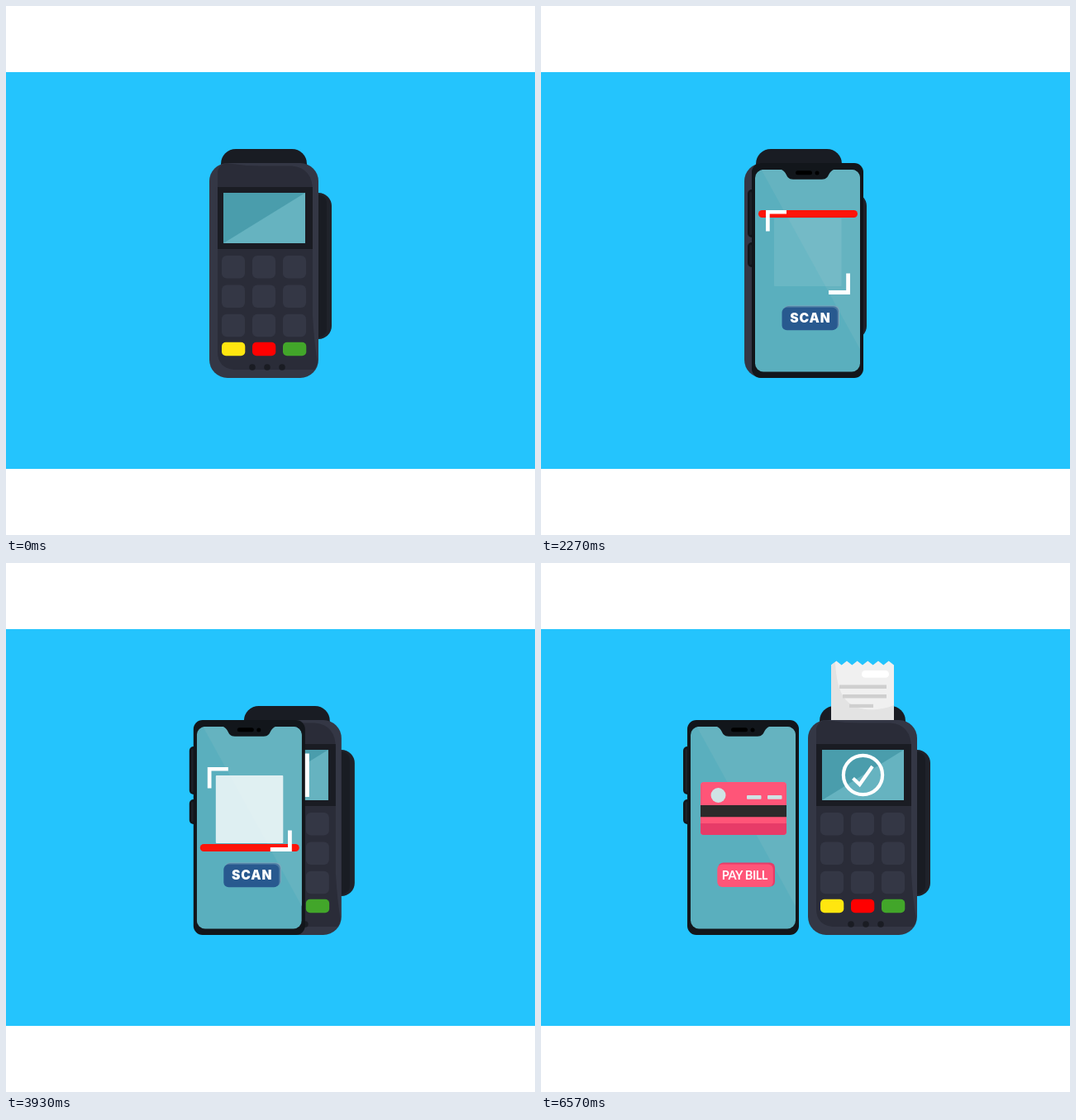
Write an HTML page with a canvas that moves like this. It is 640 px wide and 640 px high and loops after 8 s.

```html
<!DOCTYPE html>
<html lang="en">
<head>
<meta charset="utf-8">
<title>Scan and pay</title>
<style>
html, body { margin: 0; width: 100%; height: 100%; overflow: hidden; background: #fff; }
canvas { display: block; width: 640px; height: 640px; }
</style>
</head>
<body>
<canvas id="stage" width="640" height="640"></canvas>
<script>
const LOOP = 8000;
const stage = document.getElementById('stage').getContext('2d');
const scratch = document.createElement('canvas');
scratch.width = scratch.height = 640;
const layer = scratch.getContext('2d');
let c = stage;

const clamp = v => Math.max(0, Math.min(1, v));
const ramp = (t, start, len) => clamp((t - start) / len);
const inOut = p => p < 0.5 ? 4 * p ** 3 : 1 - 4 * (1 - p) ** 3;
const ease = (t, start, len) => inOut(ramp(t, start, len));
const press = (t, start) => 1 - 0.15 * (ease(t, start, 200) - ease(t, start + 200, 200));

function box(x, y, w, h, r, color) {
  c.fillStyle = color;
  c.beginPath();
  c.roundRect(x, y, w, h, r);
  c.fill();
}

function disc(x, y, r, color) {
  c.fillStyle = color;
  c.beginPath();
  c.arc(x, y, r, 0, Math.PI * 2);
  c.fill();
}

function poly(points, color) {
  c.fillStyle = color;
  c.beginPath();
  points.forEach(([x, y]) => c.lineTo(x, y));
  c.closePath();
  c.fill();
}

function shape(d, color) {
  c.fillStyle = color;
  c.fill(new Path2D(d));
}

function moved(x, y, draw) {
  c.save();
  c.translate(x, y);
  draw();
  c.restore();
}

function scaled(x, y, s, draw) {
  if (s <= 0) return;
  c.save();
  c.translate(x, y);
  c.scale(s, s);
  c.translate(-x, -y);
  draw();
  c.restore();
}

function faded(alpha, draw) {
  if (alpha <= 0) return;
  c.save();
  c.globalAlpha *= alpha;
  draw();
  c.restore();
}

// Fades everything inside as one flat picture.
function grouped(alpha, draw) {
  if (alpha <= 0) return;
  if (alpha >= 1) return draw();
  layer.clearRect(0, 0, 640, 640);
  c = layer;
  draw();
  c = stage;
  faded(alpha, () => c.drawImage(scratch, 0, 0));
}

function label(text, x, y, font, spacing) {
  c.font = font;
  c.letterSpacing = spacing + 'px';
  c.textAlign = 'center';
  c.textBaseline = 'alphabetic';
  c.fillStyle = '#fff';
  c.fillText(text, x + spacing / 2, y);
}

function receipt() {
  const edge = [[274, 200]];
  for (let i = 0; i <= 12; i++) edge.push([274 + i * 76 / 12, i % 2 ? 118.5 : 123.5]);
  edge.push([350, 200]);
  poly(edge, '#f0f0f0');
  shape('M274 123.5L279 120C280 140 283 152 289 162C299 178 326 182 350 172V200H274Z', '#e3e3e3');
  box(284, 147.5, 57, 4.5, 0, '#cfcfcf');
  box(288, 159, 53, 4.5, 0, '#cfcfcf');
  box(296, 170.8, 29, 4.2, 0, '#cfcfcf');
  box(311, 130, 33, 8.7, 4.3, '#fff');
}

function approval(t) {
  const ring = ease(t, 5240, 800);
  const tick = ease(t, 5700, 800);
  c.strokeStyle = '#fff';
  c.lineWidth = 4.2;
  if (ring > 0) {
    c.beginPath();
    c.arc(312.5, 256.5, 23.6, 0, Math.PI * 2 * ring);
    c.stroke();
  }
  if (tick > 0) {
    const first = clamp(tick / 0.3), second = clamp((tick - 0.3) / 0.7);
    c.beginPath();
    c.moveTo(300.5, 260.5);
    c.lineTo(300.5 + 8 * first, 260.5 + 7.5 * first);
    if (second > 0) c.lineTo(308.5 + 15.5 * second, 268 - 22 * second);
    c.stroke();
  }
}

function terminal(t) {
  box(260, 173, 104, 50, 18, '#191c23');
  box(350, 226, 44, 177, 16, '#1f222a');
  box(350, 228, 38, 173, [0, 10, 10, 0], '#191c23');
  const out = ease(t, 5770, 800);
  if (out > 0) moved(0, 76 * (1 - out), receipt);

  box(246, 190, 132, 260, 22, '#343745');
  shape('M256 200Q258 192 266 190Q288 193.5 310 193.5H346Q371 196 371 224V375Q373 410 377 431Q376 437 373 440H276Q256 438 256 418Z', '#2a2c38');
  box(256, 219, 115, 75, 0, '#1a1c23');
  box(263, 226, 99, 61, 0, '#4a9dac');
  poly([[362, 226], [362, 287], [263, 287]], '#66b3c0');

  for (let col = 0; col < 3; col++) {
    const x = 261 + col * 37;
    for (let row = 0; row < 3; row++) box(x, 302 + row * 35.4, 28, 27.5, 6, '#343745');
    box(x, 406.7, 28.3, 16.6, 5, ['#ffe60f', '#ff0000', '#42a62a'][col]);
    disc(298 + col * 18, 437, 3.8, '#1a1c23');
  }

  const plate = ease(t, 0, 400) - ease(t, 5190, 400);
  scaled(313, 256.7, plate, () => box(287, 230.5, 52, 52.5, 0, '#fff'));
  approval(t);
}

function scanView(t) {
  const code = 0.8 * ramp(t, 2130, 1200);
  faded(code, () => box(204, 257, 81.5, 82, 1, '#fff'));

  const grow = ease(t, 1870, 400);
  if (grow > 0) {
    const y = 247 + 93 * ease(t, 2270, 830);
    box(185, y, 120 * grow, 9, 4.5, '#ff1409');
  }

  shape('M194 247H219V251.6H198.7V272.5H194Z', '#fff');
  shape('M296 349H270V344H291.2V323.5H296Z', '#fff');

  scaled(248, 378, press(t, 1470), () => {
    box(215.5, 362.5, 67.5, 28, 6, '#7fa6bb');
    box(215, 363.3, 67, 28, 6, '#4a7ba3');
    box(213.5, 364.8, 67, 27.5, 6, '#28598f');
    label('SCAN', 247.5, 383.2, '900 15.6px Inter, sans-serif', 0.9);
  });
}

function payView(t) {
  box(193, 265, 104, 64, 4, '#ff5578');
  box(193, 315, 104, 14, [0, 0, 4, 4], '#e73b68');
  box(193, 293, 104, 14.3, 0, '#2a2a2a');
  disc(214.5, 281, 9, '#cfe3e5');
  box(249, 281, 17.5, 4.8, 1, '#cfe3e5');
  box(274, 281, 17.5, 4.8, 1, '#cfe3e5');

  scaled(248, 378, press(t, 4830), () => {
    box(214.5, 362.5, 68.5, 29, 6, '#e73b68');
    box(213.3, 364.5, 67.5, 27.5, 6, '#ff5578');
    label('PAY BILL', 246.5, 382.7, '700 14.5px Lato, sans-serif', -0.5);
  });
}

function phone(t) {
  box(172, 222, 14, 58, 5, '#12161b');
  box(172, 286, 14, 30, 5, '#12161b');
  box(174.5, 225, 2.5, 52, 1, '#1d2128');
  box(174.5, 289, 2.5, 24, 1, '#1d2128');
  box(177, 190, 135, 260, 11, '#12161b');
  c.save();
  c.beginPath();
  c.roundRect(181, 198, 127, 244.5, 10);
  c.clip();
  box(181, 198, 127, 245, 0, '#5aafbe');
  poly([[188, 197], [309, 197], [309, 417]], '#65b3c0');
  c.restore();
  shape('M208 197C222 198 216 209.7 227 209.7H262C273 209.7 267 198 281 197Z', '#12161b');
  box(230, 199.3, 20, 5, 2.5, '#000');
  disc(256, 202, 2.5, '#000');

  faded(1 - ramp(t, 4200, 300), () => scanView(t));
  faded(ramp(t, 4420, 360), () => payView(t));
}

function draw(t) {
  c = stage;
  box(0, 0, 640, 640, 0, '#fff');
  box(0, 80, 640, 480, 0, '#24c4fd');
  const apart = ease(t, 3572, 800);
  moved(77 * apart, 0, () => terminal(t));
  const arrive = ease(t, 600, 800);
  const x = 78 * (1 - apart) + 155 * (1 - arrive);
  grouped(ramp(t, 600, 400), () => moved(x, 0, () => phone(t)));
}

const begin = performance.now();
function tick(now) {
  draw(Math.max(0, now - begin) % LOOP);
  requestAnimationFrame(tick);
}
draw(0);
requestAnimationFrame(tick);
</script>
</body>
</html>
```
